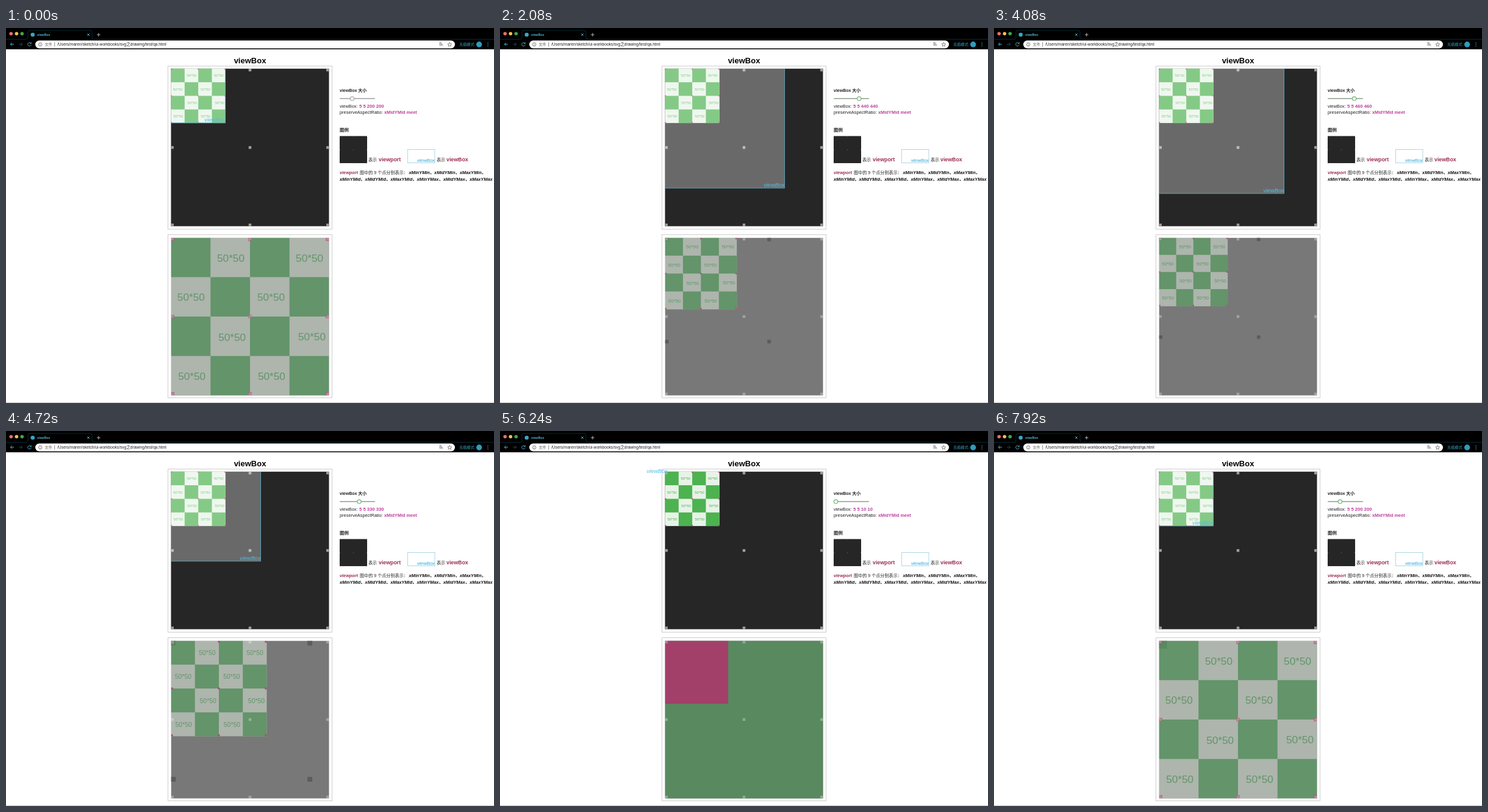
Recreate the animation shown at these times as an HTML page. Size 800 px wide and 616 px high, loop 8 s.

```html
<!DOCTYPE html>
<html lang="zh">
<head>
<meta charset="utf-8">
<title>viewBox</title>
<style>
  html, body { margin: 0; width: 100%; height: 100%; overflow: hidden; background: #fff; }
  svg { display: block; }
  #stage { width: 800px; height: 616px; font-family: "Liberation Sans", "Noto Sans CJK SC", "Noto Sans CJK", sans-serif; }
  text { white-space: pre; }
  .b { font-weight: bold; }
  .i { font-style: italic; }
  .crimson { fill: #9c2f57; }
  .pink { fill: #bf3f9f; font-weight: bold; }
  .cyan { fill: #55bbe2; }
  .line { fill: none; stroke: #4fb3d0; stroke-width: 1; }
</style>
</head>
<body>
<svg id="stage" viewBox="0 0 800 616">
  <rect width="800" height="616" fill="#fff"/>

  <!-- browser bar -->
  <rect width="800" height="35" fill="#000"/>
  <circle cx="8.3" cy="9.3" r="2.8" fill="#ee6a70"/>
  <circle cx="17.3" cy="9.3" r="2.8" fill="#f5bf4f"/>
  <circle cx="26.3" cy="9.3" r="2.8" fill="#3fa648"/>
  <path d="M0 18.5H33Q36 18.5 36 15V7Q36 4 39 4H138Q141 4 141 7V15Q141 18.5 144 18.5H800" fill="none" stroke="#0c3442" stroke-width=".8"/>
  <circle cx="43.7" cy="11" r="3.3" fill="#3aa5c4"/>
  <text x="51" y="13" font-size="5.3" class="b" fill="#4fb3d0">viewBox</text>
  <path class="line" d="M133.2 9.2l3.6 3.6m0-3.6l-3.6 3.6"/>
  <path d="M149 11h5.6m-2.8-2.8v5.6" stroke="#b5b5b5"/>
  <path class="line" d="M13 26.8H7.4m2.6-2.7l-2.7 2.7l2.7 2.7"/>
  <path class="line" opacity=".4" d="M21 26.8h5.6m-2.6-2.7l2.7 2.7l-2.7 2.7"/>
  <path class="line" d="M40.6 25A2.8 2.8 0 1 0 41.2 27.6M41.3 23.6v2h-2"/>
  <rect x="48" y="20.5" width="688" height="13" rx="6.5" fill="#fff"/>
  <g fill="none" stroke="#555" stroke-width=".7">
    <circle cx="56.2" cy="27" r="2.8"/>
    <path d="M56.2 25.3v.7m0 .8v2M79.7 23.5v7"/>
    <path d="M710 24.5h4m-2-1v1m-1.500 4.500l3-4m-3.300 1l2.500 2.500M713 29.500l1.500-3.500l1.600 3.500"/>
    <path d="M727.300 23.600l1 2.300l2.400 .2l-1.900 1.600l.6 2.400l-2.100-1.300l-2.100 1.300l.6-2.400l-1.900-1.600l2.400-.2z"/>
  </g>
  <text x="63.5" y="29.300" font-size="6.200" fill="#666">文件</text>
  <text x="84" y="29.300" font-size="6.600" fill="#222">/Users/maren/sketch/ui-workbooks/svg之drawing/test/qa.html</text>
  <text x="743" y="29.300" font-size="6.200" fill="#3aa5c4">无痕模式</text>
  <circle cx="775.600" cy="27" r="4.700" fill="#2d9cbd"/>
  <g fill="#4fb3d0"><circle cx="790" cy="24.300" r=".7"/><circle cx="790" cy="27" r=".7"/><circle cx="790" cy="29.700" r=".7"/></g>

  <text x="400" y="58.300" font-size="13" class="b" text-anchor="middle">viewBox</text>

  <!-- upper panel -->
  <rect x="265.500" y="62.500" width="269" height="268" fill="#fff" stroke="#cfcfcf"/>
  <g transform="translate(270.500 66.800)">
    <rect width="259" height="258.800" fill="#262626"/>
    <g id="topDots" fill="#9c9c9c"></g>
    <g id="small"></g>
    <rect id="box" fill="#fff" fill-opacity=".31"/>
    <path id="edge" fill="none" stroke="#5aaecb" stroke-width=".8"/>
    <text id="label" class="i cyan" font-size="9.200" text-anchor="end">viewBox</text>
  </g>

  <!-- lower panel -->
  <rect x="265.500" y="339.500" width="269" height="268" fill="#fff" stroke="#cfcfcf"/>
  <svg id="zoom" x="270.500" y="344.500" width="259" height="259">
    <rect width="600" height="600" fill="#787878"/>
    <g id="darkDots" fill="#5c5c5c"></g>
    <g id="large" opacity=".6"></g>
  </svg>
  <g id="lightDots" transform="translate(270.500 344.500)" fill="#fff" opacity=".3"></g>

  <!-- controls -->
  <g font-size="7.400" fill="#222">
    <text x="547" y="105" class="b" font-size="7">viewBox 大小</text>
    <rect id="track" x="547" y="115" width="58" height="1.700" rx=".8"/>
    <circle id="thumb" cy="115.900" r="3.100" fill="#fff" stroke-width="1.200"/>
    <text x="547" y="131">viewBox:</text>
    <text x="579" y="131" id="size" class="pink" font-size="7.700"></text>
    <text x="547" y="141">preserveAspectRatio:</text>
    <text x="620" y="141" class="pink">xMidYMid meet</text>
    <text x="547" y="170" class="b">图例</text>

    <rect x="547" y="177.500" width="45" height="44.500" fill="#262626"/>
    <g id="keyDots" transform="translate(547 177.500) scale(.0775)" fill="#8a8a8a"></g>
    <text x="594" y="218.500" font-size="7.100">表示</text>
    <text x="611" y="218.800" font-size="8.800" class="b crimson">viewport</text>
    <rect x="658.500" y="199.500" width="44.500" height="22" fill="#fff" stroke="#9ccfdf" stroke-width=".8"/>
    <text x="703" y="219.500" font-size="7.800" class="i cyan" text-anchor="end" stroke="#55bbe2" stroke-width=".2">viewBox</text>
    <text x="706" y="218.500" font-size="7.100">表示</text>
    <text x="722" y="218.800" font-size="8.800" class="b crimson">viewBox</text>

    <text x="547" y="239.500" font-size="7.300" class="b i crimson">viewport</text>
    <text x="580" y="239.500" font-size="7.100">图中的 9 个点分别表示：</text>
    <g class="b i" font-size="7.350" fill="#111">
      <text x="660.500" y="239.500">xMinYMin、xMidYMin、xMaxYMin、</text>
      <text x="547" y="250.700">xMinYMid、xMidYMid、xMaxYMid、xMinYMax、xMidYMax、xMaxYMax</text>
    </g>
  </g>
  <rect y="615.400" width="800" height=".6" fill="#999"/>
</svg>

<script>
const $ = id => document.getElementById(id);
const FULL = 580, PANEL = 259, UNIT = PANEL / FULL, LOOP = 8000, FRAME = 80;

// viewBox size over time: [ms, size]
const drag = [[0, 200], [400, 200], [1440, 290], [2720, 580], [3360, 580], [4080, 460],
              [5280, 210], [6160, 10], [6640, 10], [7760, 200], [LOOP, 200]];

// start x and middle y of each caption, in board units
const captions = [[58.3, 25.8], [158, 25.8], [8, 75.5], [109.3, 75.5],
                  [60, 126.2], [161, 125.8], [9, 175.7], [110, 175.7]];

const square = (x, y, s, attrs = '') => `<rect x="${x}" y="${y}" width="${s}" height="${s}" ${attrs}/>`;

// nine anchor points inside a square of the given span
function dots(span, s) {
  const at = [0, (span - s) / 2, span - s];
  return at.flatMap(y => at.map(x => square(x, y, s))).join('');
}

function board(green, pale) {
  let out = square(0, 0, 200, `fill="${pale}"`);
  for (let i = 0; i < 16; i++) {
    const col = i % 4, row = i >> 2;
    if ((col + row) % 2 === 0) out += square(col * 50, row * 50, 50, `fill="${green}"`);
  }
  out += captions.map(([x, y]) =>
    `<text x="${x}" y="${y + 4.7}" font-size="13.3" fill="${green}">50*50</text>`).join('');
  return out + `<g fill="rgb(208,45,115)">${dots(200, 4)}</g>`;
}

$('topDots').innerHTML = $('lightDots').innerHTML = dots(PANEL, 10 * UNIT);
$('darkDots').innerHTML = dots(FULL, 10);
$('keyDots').innerHTML = dots(FULL, 12);
$('small').innerHTML = board('rgb(77,178,80)', '#e8f3e8');
$('small').setAttribute('transform', `scale(${UNIT})`);
$('large').innerHTML = board('rgb(87,167,97)', 'rgb(208,222,208)');

function sizeAt(t) {
  const k = drag.findIndex(p => p[0] > t);
  const [t0, a] = drag[k - 1], [t1, b] = drag[k];
  return Math.round((a + (b - a) * (t - t0) / (t1 - t0)) / 10) * 10;
}

function set(id, attrs) {
  for (const name in attrs) $(id).setAttribute(name, attrs[name]);
}

function draw(t) {
  const s = sizeAt(t), w = s * UNIT, active = t >= 240;
  set('box', { width: w, height: w });
  set('edge', { d: `M${w - .4} 0V${w - .4}H0` });
  set('label', { x: w - .3, y: w - 2.3 });
  set('zoom', { viewBox: `0 0 ${s} ${s}` });
  set('darkDots', { visibility: active ? 'visible' : 'hidden' });
  set('track', { fill: active ? '#9dac9d' : '#adadad' });
  set('thumb', { cx: 550.5 + (s - 10) / 570 * 50.7, stroke: active ? '#72b576' : '#aaa' });
  $('size').textContent = `5 5 ${s} ${s}`;
}

function tick(now) {
  draw(Math.floor(now % LOOP / FRAME) * FRAME);
  requestAnimationFrame(tick);
}
draw(0);
requestAnimationFrame(tick);
</script>
</body>
</html>
```
